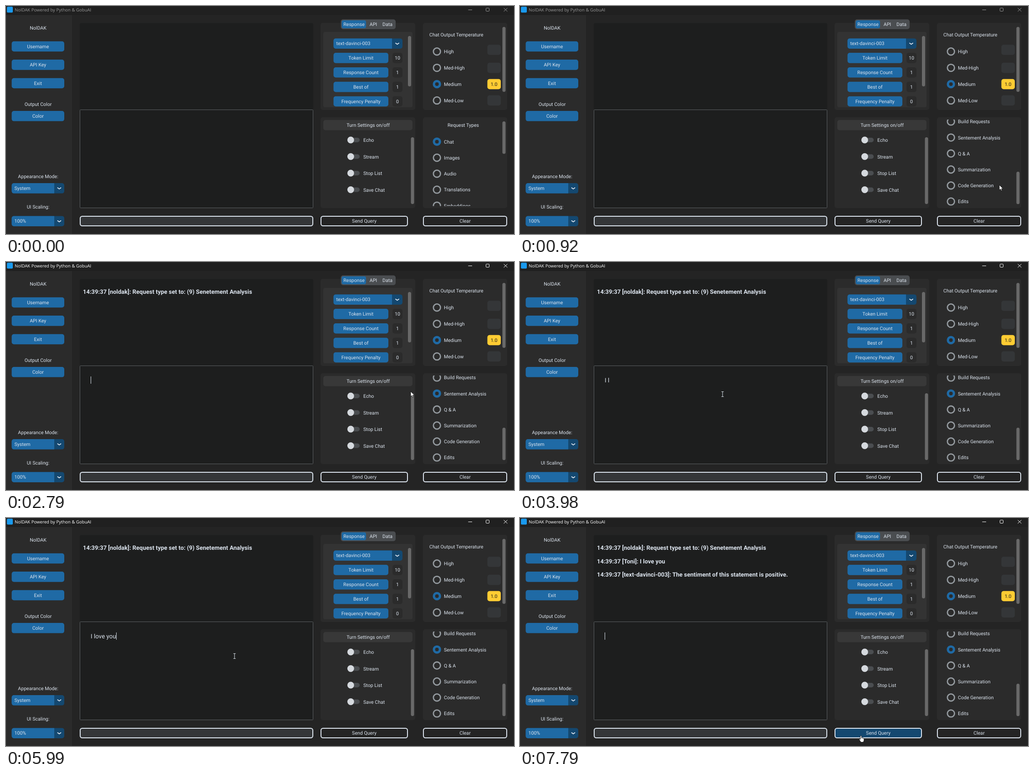
An HTML page with a canvas that plays this animation: 1116 by 502 pixels, repeating every 8000 ms.

```html
<!DOCTYPE html>
<html lang="en">
<head>
<meta charset="utf-8">
<title>NolDAK</title>
<style>
html, body { margin: 0; width: 100%; height: 100%; overflow: hidden; background: #242424; }
canvas { display: block; }
</style>
</head>
<body>
<canvas id="stage" width="1116" height="502"></canvas>
<script>
const ctx = document.getElementById('stage').getContext('2d');
const LOOP = 8000;
const BLUE = '#1f6aa5', DARK_BLUE = '#144870', INK = '#dce4ee', PANEL = '#2b2b2b',
      FIELD = '#343638', GREY = '#949a9f', THUMB = '#696969', BOX = '#1d1e1e';

const REQUESTS = ['Chat', 'Images', 'Audio', 'Translations', 'Embeddings', 'Files',
  'Fine Tuning', 'Moderations', 'Build Requests', 'Sentement Analysis', 'Q & A',
  'Summarization', 'Code Generation', 'Edits'];
const MESSAGE = 'I love you';
const KEY_TIMES = [3650, 3790, 3850, 4190, 4460, 4520, 4590, 5130, 5190, 5320];
const SCROLL_TIMES = [590, 660, 720, 790, 850, 920];
const LOG = [
  [2590, '14:39:37 [noldak]: Request type set to: (9) Senetement Analysis'],
  [7340, '14:39:37 [Toni]: I love you'],
  [7340, '14:39:37 [text-davinci-003]: The sentiment of this statement is positive.']
];
// time, x, y, shape
const POINTER = [
  [120, 1043, 434, 'arrow'], [190, 1053, 394, 'arrow'],
  [1260, 1028, 372, 'arrow'], [1330, 992, 338, 'arrow'], [1390, 964, 310, 'arrow'],
  [1460, 954, 300, 'arrow'], [1730, 954, 300, 'hand'], [1790, 949, 295, 'hand'],
  [1860, 945, 291, 'hand'],
  [2790, 889, 285, 'arrow'], [2860, 705, 291, 'arrow'], [2920, 560, 297, 'beam'],
  [2990, 490, 294, 'beam'], [3050, 455, 292, 'beam'], [3120, 445, 291, 'beam']
];
const GLIDE = { start: 5990, end: 6720, steps: 11, from: [502, 304], to: [749, 479] };

const passed = (times, t) => times.filter(v => v <= t).length;

function rect(x, y, x2, y2, fill, r = 0, stroke, width = 1) {
  ctx.beginPath();
  ctx.roundRect(x, y, x2 - x, y2 - y, r);
  if (fill) { ctx.fillStyle = fill; ctx.fill(); }
  if (stroke) { ctx.strokeStyle = stroke; ctx.lineWidth = width; ctx.stroke(); }
}

function disc(x, y, r, fill) {
  ctx.beginPath();
  ctx.arc(x, y, r, 0, Math.PI * 2);
  ctx.fillStyle = fill;
  ctx.fill();
}

function line(points, color, width) {
  ctx.beginPath();
  points.forEach(([x, y], i) => i ? ctx.lineTo(x, y) : ctx.moveTo(x, y));
  ctx.strokeStyle = color;
  ctx.lineWidth = width;
  ctx.stroke();
}

// cy is the middle of the capitals
function text(str, x, cy, { align = 'left', size = 10.6, weight = 400, color = INK, family = 'Roboto' } = {}) {
  ctx.font = `${weight} ${size}px "${family}", sans-serif`;
  ctx.textAlign = align;
  ctx.fillStyle = color;
  ctx.fillText(str, x, cy + size * 0.356);
}

const centered = (str, x, cy, color = INK) => text(str, x, cy, { align: 'center', color });

function button(label, x, x2, cy) {
  rect(x, cy - 11.3, x2, cy + 11.3, BLUE, 5);
  centered(label, (x + x2) / 2, cy);
}

function dropdown(label, x, split, x2, cy) {
  rect(x, cy - 11.3, x2, cy + 11.3, DARK_BLUE, 5);
  rect(x, cy - 11.3, split, cy + 11.3, BLUE, [5, 0, 0, 5]);
  text(label, x + 6, cy);
  const c = (split + x2) / 2;
  ctx.lineCap = ctx.lineJoin = 'round';
  line([[c - 3.5, cy - 1], [c, cy + 1.6], [c + 3.5, cy - 1]], INK, 1.8);
  ctx.lineCap = 'butt';
  ctx.lineJoin = 'miter';
}

function outlined(label, x, x2, fill) {
  rect(x + 1, 463, x2 - 1, 484, fill, 4.5, INK, 2);
  centered(label, (x + x2) / 2, 473.5);
}

function radio(label, cy, selected, hover) {
  const width = selected ? 5.2 : 2.8;
  ctx.beginPath();
  ctx.arc(946.7, cy, 9.2 - width / 2, 0, Math.PI * 2);
  ctx.lineWidth = width;
  ctx.strokeStyle = selected ? BLUE : hover ? DARK_BLUE : GREY;
  ctx.stroke();
  text(label, 962, cy + 0.3);
}

function titleBar(t) {
  const color = t >= 2390 ? '#ffffff' : '#989898';
  rect(0, 0, 1116, 20, '#202020');
  rect(2, 1.5, 15, 14.5, '#1a9aee', 2);
  text('NolDAK Powered by Python & GobuAI', 19, 8.5, { size: 9.6, color, family: 'Open Sans' });
  line([[1015.5, 8.5], [1024, 8.5]], color, 1);
  rect(1054.5, 4.5, 1061.5, 11.5, null, 1, color);
  line([[1093.5, 4.5], [1101.5, 12]], color, 1);
  line([[1101.5, 4.5], [1093.5, 12]], color, 1);
}

function sidebar() {
  rect(0, 20, 145, 502, PANEL);
  centered('NolDAK', 70.5, 48.5);
  button('Username', 12.5, 128, 89);
  button('API Key', 12.5, 128, 129.4);
  button('Exit', 12.5, 128, 170);
  centered('Output Color', 70.5, 216);
  button('Color', 12.5, 128, 242.3);
  centered('Appearance Mode:', 70.5, 375);
  dropdown('System', 12.5, 106, 128, 401.3);
  centered('UI Scaling:', 70.5, 442);
  dropdown('100%', 12.5, 106, 128, 473.7);
}

function console_(t) {
  rect(162, 37.5, 675, 229, BOX, 4);
  rect(162.5, 228.5, 674.5, 444.5, BOX, 1, '#5c6063');
  rect(163, 463, 674, 484, FIELD, 4.5, INK, 2);
  LOG.forEach(([time, str], i) => {
    if (t >= time) text(str, 169, 65.7 + i * 29.3, { size: 13, weight: 700 });
  });
  const typed = t < 7340 ? MESSAGE.slice(0, passed(KEY_TIMES, t)) : '';
  text(typed, 186, 260.5, { size: 13.4 });
  const blinkOn = t >= 2390 && (t - 2390) % 900 < 600;
  if (blinkOn) rect(Math.round(186 + ctx.measureText(typed).width), 252, Math.round(187 + ctx.measureText(typed).width), 268, INK);
}

function responsePanel() {
  rect(691, 37, 899, 229, PANEL, 5);
  rect(697, 57, 893, 223, '#333333', 4);
  rect(735.5, 29.5, 856, 51, '#4a4d50', 5);
  rect(737.5, 31.5, 791, 49, BLUE, 4);
  centered('Response', 764.5, 40);
  centered('API', 807, 40);
  centered('Data', 838, 40);
  dropdown('text-davinci-003', 719.5, 848, 871, 82.7);
  [['Token Limit', '10'], ['Response Count', '1'], ['Best of', '1'], ['Frequency Penalty', '0']]
    .forEach(([label, value], i) => {
      const cy = 114.4 + i * 31.85;
      button(label, 719.5, 840, cy);
      rect(849, cy - 11.3, 871, cy + 11.3, PANEL, 5);
      centered(value, 860, cy);
    });
  rect(883, 66, 890, 177, THUMB, 3.5);
}

function temperaturePanel() {
  rect(916, 37, 1101, 229, PANEL, 5);
  text('Chat Output Temperature', 930, 62.8);
  ['High', 'Med-High', 'Medium', 'Med-Low'].forEach((label, i) => {
    const cy = 100.2 + i * 35.9, on = i === 2, boxY = i ? cy : 96.5;
    radio(label, cy, on);
    rect(1057.5, boxY - 11.3, 1087, boxY + 11.3, on ? '#ffcc33' : FIELD, 5);
    if (on) centered('1.0', 1072, cy, '#1a1a1a');
  });
  rect(1090.5, 46, 1097.5, 189, THUMB, 3.5);
}

function switchPanel() {
  rect(691, 245, 899, 445, PANEL, 5);
  rect(697, 251, 893, 273.5, '#383838', 5);
  centered('Turn Settings on/off', 795.5, 262.7);
  ['Echo', 'Stream', 'Stop List', 'Save Chat'].forEach((label, i) => {
    const cy = 295 + i * 36.5;
    rect(750.5, cy - 5, 777, cy + 5, '#4a4d50', 5);
    disc(757.3, cy, 7.4, '#d5d9de');
    text(label, 785, cy + 0.3);
  });
  rect(889.5, 289, 896.5, 436, THUMB, 3.5);
}

function requestPanel(t) {
  const scroll = Math.min(passed(SCROLL_TIMES, t) * 62, 326);
  rect(916, 245, 1101, 445, PANEL, 5);
  ctx.save();
  ctx.beginPath();
  ctx.rect(920, 250, 166, 190.5);
  ctx.clip();
  centered('Request Types', 1004.5, 262 - scroll);
  const chosen = t >= 2460 ? 9 : 0;
  REQUESTS.forEach((label, i) =>
    radio(label, 298.8 + i * 35.2 - scroll, i === chosen, i === 9 && t >= 1730));
  ctx.restore();
  const top = 254 + scroll * 0.34;
  rect(1090.5, top, 1097.5, top + 71.5, THUMB, 3.5);
}

function pointerAt(t) {
  if (t >= GLIDE.start) {
    const span = (GLIDE.end - GLIDE.start) / GLIDE.steps;
    const p = Math.min(Math.floor((t - GLIDE.start) / span + 0.01), GLIDE.steps) / GLIDE.steps;
    const e = p * p * (3 - 2 * p);
    const [x, y] = GLIDE.from.map((a, i) => Math.round(a + (GLIDE.to[i] - a) * e));
    const onButton = x > 691 && y > 462;
    return { x, y, onButton, shape: onButton ? 'hand' : x < 675 && y < 485 ? 'beam' : 'arrow' };
  }
  const step = POINTER[passed(POINTER.map(k => k[0]), t) - 1];
  return step && { x: step[1], y: step[2], shape: step[3] };
}

const SHAPES = {
  arrow: new Path2D('M0 0V11.3L2.6 8.9L4.3 12.8L6.2 12L4.5 8.2H8Z'),
  hand: new Path2D('M-1.3 1Q0 -1 1.3 1V4.6Q2.6 3.8 3.3 5.2Q4.6 4.5 5.1 5.8Q6.8 5.4 6.8 7.2V10.2Q6.6 12.2 5.4 13.6V14.6H-.7V13.4L-3.6 9.2Q-4.4 7.5 -3 7.2Q-2.1 7.2 -1.3 8.4Z')
};

function drawPointer({ x, y, shape }) {
  ctx.save();
  ctx.translate(x, y);
  if (shape === 'beam') {
    line([[-2.5, -5.5], [2.5, -5.5]], INK, 1);
    line([[0, -5.5], [0, 5.5]], INK, 1);
    line([[-2.5, 5.5], [2.5, 5.5]], INK, 1);
  } else {
    ctx.lineWidth = 0.9;
    ctx.strokeStyle = '#111111';
    ctx.fillStyle = '#ffffff';
    ctx.fill(SHAPES[shape]);
    ctx.stroke(SHAPES[shape]);
    if (shape === 'hand') {
      line([[1.3, 4.8], [1.3, 7]], '#333333', 0.6);
      line([[3.3, 5.3], [3.3, 7.2]], '#333333', 0.6);
      line([[5.1, 5.9], [5.1, 7.4]], '#333333', 0.6);
    }
  }
  ctx.restore();
}

function draw(t) {
  ctx.textRendering = 'geometricPrecision';
  rect(0, 0, 1116, 502, '#242424');
  titleBar(t);
  sidebar();
  console_(t);
  responsePanel();
  temperaturePanel();
  switchPanel();
  requestPanel(t);
  const pointer = pointerAt(t);
  outlined('Send Query', 691, 883, pointer && pointer.onButton ? DARK_BLUE : '#242424');
  outlined('Clear', 916, 1101, '#242424');
  const pressed = (t >= 1930 && t < 1990) || (t >= 6930 && t < 7190);
  if (pressed) disc(pointer.x, pointer.y, 10, 'rgba(255, 0, 0, 0.47)');
  if (pointer) drawPointer(pointer);
}

const begin = performance.now();
function tick() {
  draw((performance.now() - begin) % LOOP);
  requestAnimationFrame(tick);
}
tick();
</script>
</body>
</html>
```
